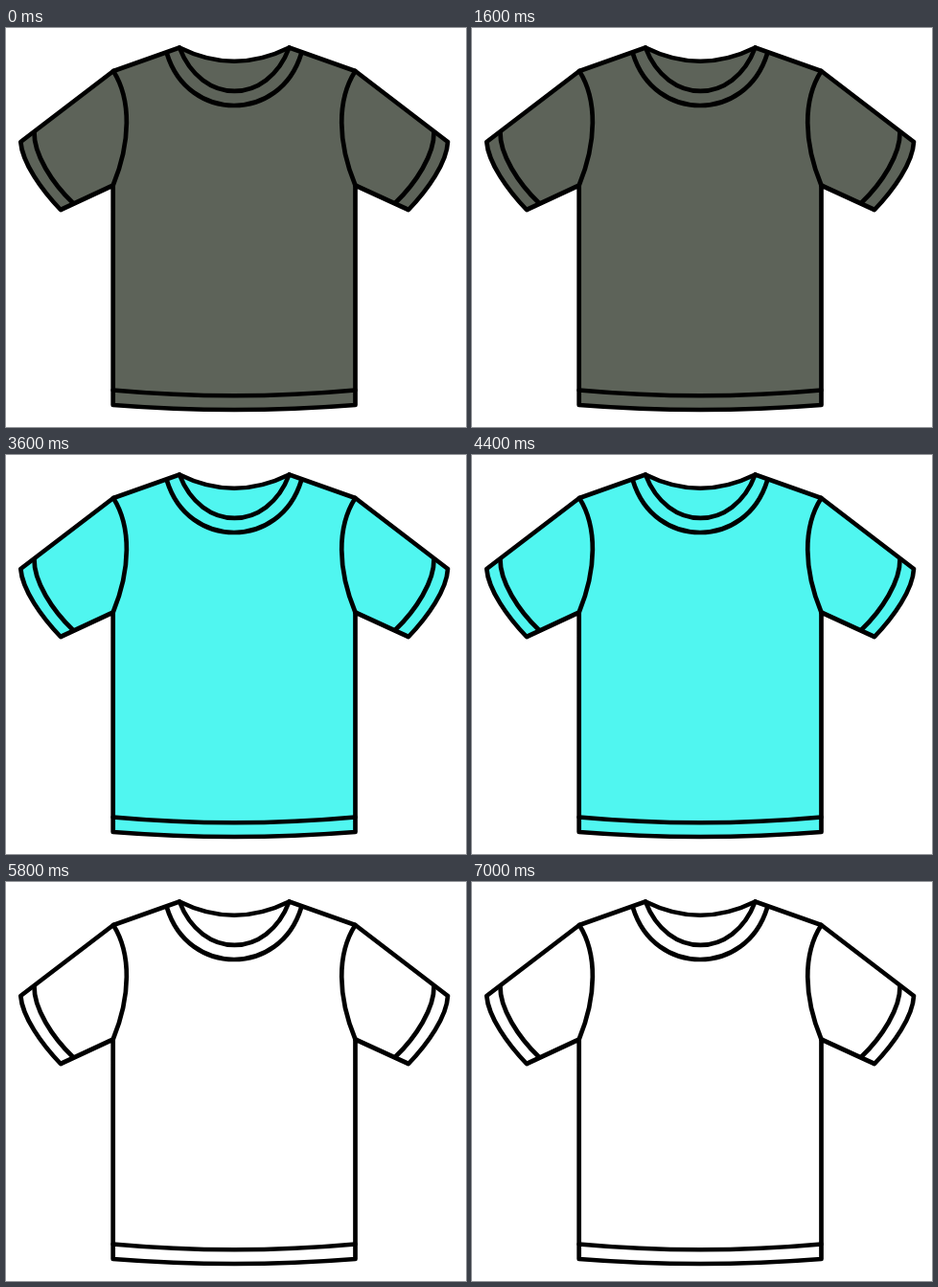
Animation, 480 px wide and 417 px high, one loop 7.2 s. Source, as an HTML page:

```html
<!DOCTYPE html>
<html lang="en">
<head>
<meta charset="utf-8">
<title>Colour-changing T-shirt</title>
<style>
  html, body { margin: 0; width: 100%; height: 100%; overflow: hidden; background: #fff; }
  svg { display: block; width: 100%; height: 100%; }
  path { fill: none; stroke: #000; stroke-width: 4.7; stroke-linejoin: round; stroke-linecap: round; }
  .shirt { animation: dye 800ms step-end infinite; }
  @keyframes dye {
    0% { fill: #5d6359; }
    25% { fill: #fff; }
    50% { fill: #50f6f0; }
    75%, 100% { fill: #fff; }
  }
</style>
</head>
<body>
<svg viewBox="0 0 480 417">
  <path class="shirt" d="M181 20.500L112 45L15.300 119C17 141 37 169 57 190L111.700 164.500V394Q238 404 364.500 394V164.500L420 190C440 169 460 141 461 119L364.500 45L295.500 20.500Q238 49 181 20.500Z"/>
  <!-- collar -->
  <path d="M168 27C190 99 286 99 308 27M181 20.500C204 81 273 81 295.500 20.500"/>
  <!-- armholes -->
  <path d="M112 45C131 75 130 120 111.700 164.500M364.500 45C345 75 346 120 364.500 164.500"/>
  <!-- cuffs and hem -->
  <path d="M29.500 109C29 132 48 162 70 183M446.500 109C447 132 428 162 406 183M111.700 378.500Q238 390 364.500 378.500"/>
</svg>
</body>
</html>
```
